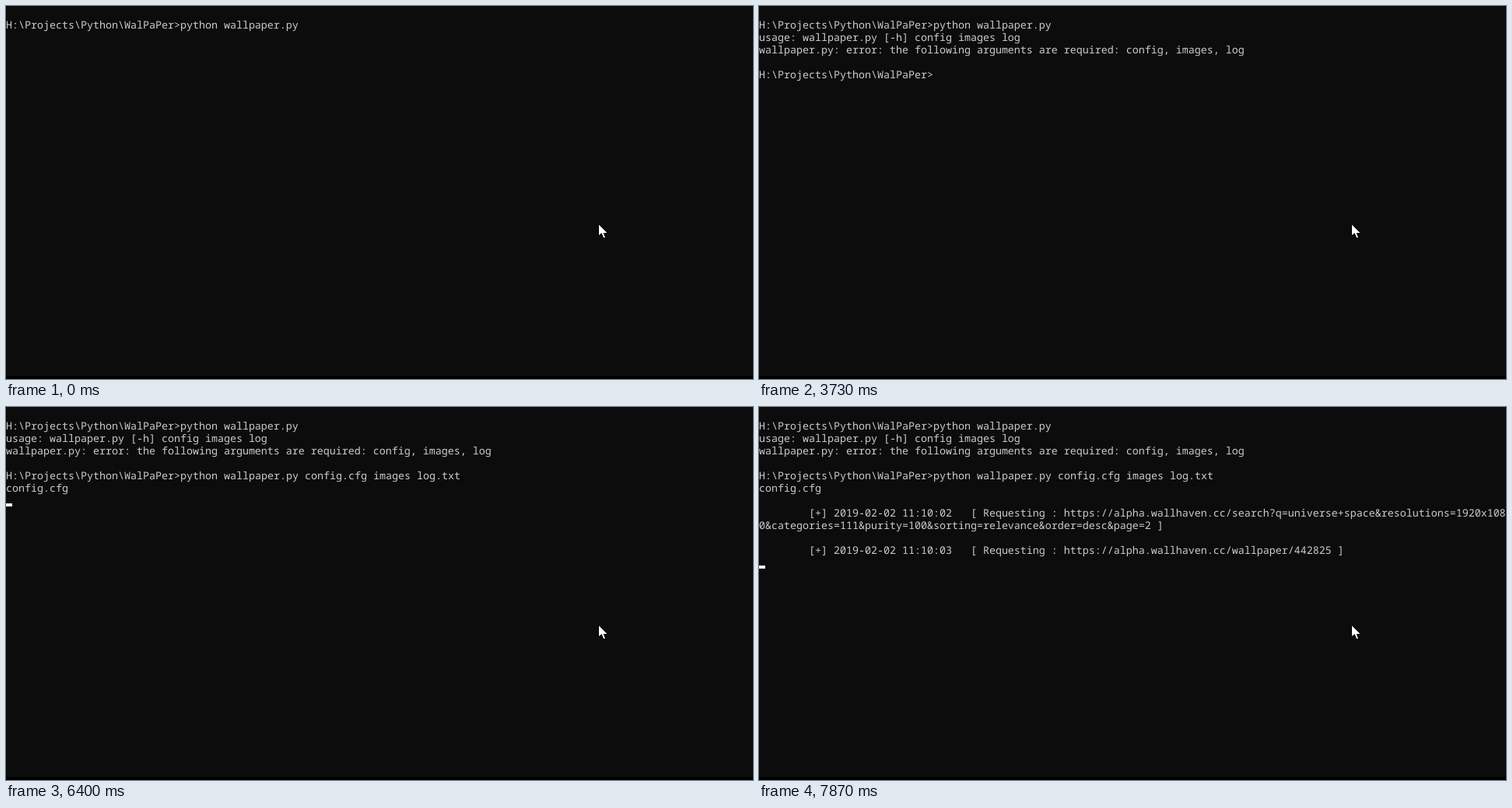
These frames come from a looping animation (960 by 480 pixels, 8000 ms). An HTML page:

```html
<!DOCTYPE html>
<html lang="en">
<head>
<meta charset="utf-8">
<title>Console session</title>
<style>
  html, body { margin: 0; width: 100%; height: 100%; overflow: hidden; background: #0c0c0c; }
  svg { display: block; width: 960px; height: 480px; }
  text {
    font: 13.3333px "Noto Sans Mono", "DejaVu Sans Mono", monospace;
    font-variant-ligatures: none;
    white-space: pre;
    text-rendering: geometricPrecision;
    fill: #ccc;
  }
</style>
</head>
<body>
<svg viewBox="0 0 960 480">
  <rect width="960" height="480" fill="#0c0c0c"/>
  <rect y="476" width="960" height="4" fill="#000"/>
  <g id="screen"></g>
  <rect id="caret" width="8" height="4" fill="#f3f3f3"/>
  <path transform="translate(761 280)" d="M1 1.5V15L4.5 12L7 18H9L6.7 12H11V11.5Z"
        fill="#fff" stroke="#000" stroke-width="1" paint-order="stroke"/>
</svg>
<script>
const LOOP = 8000, CELL_W = 8, CELL_H = 16;
const prompt = "H:\\Projects\\Python\\WalPaPer>";
const site = "https://alpha.wallhaven.cc/";
const request = (time, url) => `        [+] 2019-02-02 ${time}   [ Requesting : ${url}`;

// [time, column, row, text]
const output = [
  [0, 0, 1, prompt + "python wallpaper.py"],
  [1870, 0, 2, "usage: wallpaper.py [-h] config images log"],
  [1870, 0, 3, "wallpaper.py: error: the following arguments are required: config, images, log"],
  [1870, 0, 5, prompt],
  [3800, 28, 5, "python wallpaper.py"],
  [4330, 48, 5, "config.cfg images log.txt"],
  [6270, 0, 6, "config.cfg"],
  [6470, 0, 8, request("11:10:02", site + "search?q=universe+space&resolutions=1920x108")],
  [6470, 0, 9, "0&categories=111&purity=100&sorting=relevance&order=desc&page=2 ]"],
  [7870, 0, 11, request("11:10:03", site + "wallpaper/442825 ]")]
];

// [time on, time off, column, row]
const blinks = [
  [530, 1130, 48, 1],
  [1600, 1870, 0, 2],
  [1870, 2670, 28, 5],
  [3200, 3730, 28, 5],
  [3800, 4270, 48, 5],
  [4330, 4800, 73, 5],
  [5330, 5870, 73, 5],
  [6400, 6470, 0, 7],
  [7470, 7870, 0, 10],
  [7870, LOOP, 0, 12]
];

const screen = document.getElementById("screen");
const caret = document.getElementById("caret");

const lines = output.map(([from, col, row, text]) => {
  const el = document.createElementNS("http://www.w3.org/2000/svg", "text");
  el.setAttribute("x", col * CELL_W);
  el.setAttribute("y", row * CELL_H + 13);
  el.textContent = text;
  screen.append(el);
  return { el, from };
});

function show(el, on) {
  el.style.visibility = on ? "visible" : "hidden";
}

function draw(t) {
  for (const { el, from } of lines) show(el, t >= from);
  const blink = blinks.find(([on, off]) => t >= on && t < off);
  show(caret, blink);
  if (blink) {
    caret.setAttribute("x", blink[2] * CELL_W);
    caret.setAttribute("y", blink[3] * CELL_H + 12);
  }
}

const start = performance.now();
function tick(now) {
  draw(Math.max(0, now - start) % LOOP);
  requestAnimationFrame(tick);
}
draw(0);
requestAnimationFrame(tick);
</script>
</body>
</html>
```
